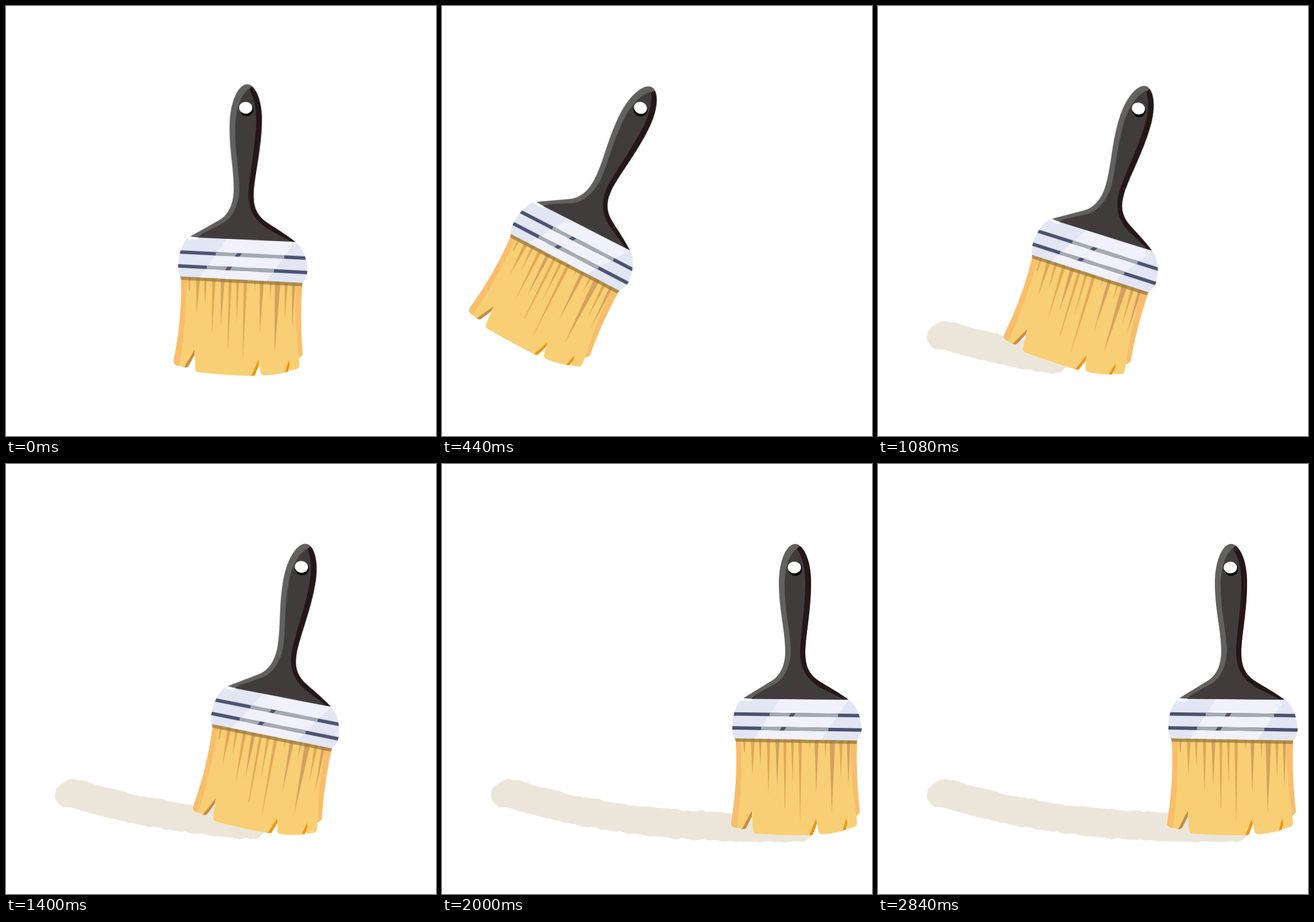
Write an HTML page without scripts that moves like this. It is 748 px wide and 748 px high and loops after 2880 ms.

```html
<!DOCTYPE html>
<html lang="en">
<head>
<meta charset="utf-8">
<title>Paint brush</title>
<style>
  html, body { margin: 0; width: 100%; height: 100%; overflow: hidden; background: #fff; }
  svg { display: block; width: 100%; height: 100%; }

  /* The small negative delay keeps each 40 ms pose clear of its step boundary. */
  .brush, .paint, .trail { animation: 2880ms linear -5ms infinite; }

  .brush { animation-name: sweep; transform-origin: 613px 181px; }
  @keyframes sweep {
    0% { transform: translate(-196px, -3px) rotate(2deg); animation-timing-function: steps(12); }
    16.6667% { transform: translate(-274.7px, -3px) rotate(28.8deg); animation-timing-function: steps(36); }
    66.6667%, 100% { transform: translate(0px, 0px) rotate(0deg); }
  }

  .paint { animation-name: appear; }
  @keyframes appear {
    0%, 18.05% { visibility: hidden; }
    18.0556%, 100% { visibility: visible; }
  }

  .trail {
    animation-name: draw;
    fill: none; stroke: #ece6da; stroke-width: 50; stroke-linecap: round;
    stroke-dasharray: 1 2;
  }
  @keyframes draw {
    0% { stroke-dashoffset: 1; }
    19.4444% { stroke-dashoffset: 1; animation-timing-function: steps(34); }
    66.6667%, 100% { stroke-dashoffset: 0; }
  }
</style>
</head>
<body>
<svg viewBox="0 0 748 748">
  <defs>
    <filter id="rough" filterUnits="userSpaceOnUse" x="60" y="520" width="640" height="170" color-interpolation-filters="sRGB">
      <feTurbulence type="fractalNoise" baseFrequency=".05" numOctaves="2" seed="4"/>
      <feDisplacementMap in="SourceGraphic" xChannelSelector="R" yChannelSelector="G" scale="6">
        <animate attributeName="scale" values="5;6;7;6" dur="160ms" calcMode="discrete" repeatCount="indefinite"/>
      </feDisplacementMap>
    </filter>
    <clipPath id="ferrule">
      <path id="ferruleShape" d="M523 407L707 410C721 419 729 439 730 462Q729 473 722 481L509 477Q505 470 505 460C505 437 511 418 523 407z"/>
    </clipPath>
  </defs>

  <g class="paint" filter="url(#rough)">
    <circle cx="106" cy="577" r="21" fill="#ece6da"/>
    <path class="trail" pathLength="1" d="M116 572C272 622 450 635 622 632"/>
  </g>

  <g class="brush">
    <!-- bristles -->
    <path fill="#f8cf74" d="M511 478C514 540 510 580 503 625Q503 630 508 632L521 635Q526 635 528 632L539 604L541 638Q542 642 547 643Q595 646 640 646L651 616L655 640Q657 644 662 644Q680 643 697 638L703 617L705 635L718 631Q722 629 722 625L721 612L727 606C723 570 720 530 722 480z"/>
    <path fill="#f9bd6c" d="M511 478C514 540 510 580 503 625Q503 630 508 632L513 633C519 590 522 540 521 478zM711 480C710 530 715 575 721 612L727 606C723 570 720 530 722 480z"/>
    <path fill="#c68c46" d="M539 603V613L529 633Q526 636 522 635z"/>
    <path fill="#ef950f" d="M651 616L652 626L645 645L639 646zM703 616L705 624L703 636L697 638z"/>
    <path fill="#e2a655" d="M524 478h4l-1 23h-2zM537 478h7l-4 64zM551 478h5l-2 48zM565 478h6l-3 98zM594 478h5l-2 121h-1zM607 478h5l-2 79zM620 478h6l-3 147zM638 478h3l-1 19zM665 478h4l-2 34zM691 478h6l-3 68z"/>
    <path fill="#d5a05f" d="M580 478h7l-4 82zM648 478h7l-4 96zM674 478h10l-6 129zM704 478h6l-3 84z"/>
    <path fill="#957638" fill-opacity=".7" d="M508 474L723 479L721 487L511 483z"/>

    <!-- ferrule -->
    <use href="#ferruleShape" fill="#e2e6f4"/>
    <g clip-path="url(#ferrule)">
      <path fill="#f1f1fb" d="M589 407L708 409L658 482L542 480z"/>
      <g transform="translate(0 .8)">
        <g fill="none" stroke-width="6">
          <path stroke="#4b5270" d="M500 434L735 437M500 458L735 462"/>
          <path stroke="#a5aab2" d="M570 435L689 436.5M555 459L672 461"/>
        </g>
        <path fill="#4b5270" d="M607 432.500h8l-4 6h-8zM591 456.700h8l-4 6h-8z"/>
      </g>
    </g>

    <!-- handle -->
    <path fill="#636060" d="M614 139C599 140 586 168 586 208C586 252 596 285 597 322C598 350 588 369 572 378L523 408L707 410C690 397 672 388 655 377C638 365 632 351 632 328C632 300 642 256 642 206C642 168 629 139 614 139z"/>
    <path fill="#251617" d="M622 142C635 152 642 178 642 206C642 256 632 300 632 328C632 351 638 365 655 377C672 388 690 397 707 410L690 409.500L618 370V147z"/>
    <path fill="#403c3b" d="M617 147C603 158 596 184 596 212C596 255 606 291 607 324C606 351 596 373 580 382L546 401L537 408.500L700 410L662 391C636 378 623 356 623 328C623 300 632 250 632 206C632 180 626 159 617 147z"/>
    <path fill="#fff" d="M521 407L538 408.500L541 411L534 412.500L521 411.500z"/>
    <circle cx="614.500" cy="182.500" r="12"/>
    <ellipse cx="613" cy="180" rx="11.500" ry="10.300" fill="#fff"/>
  </g>
</svg>
</body>
</html>
```
